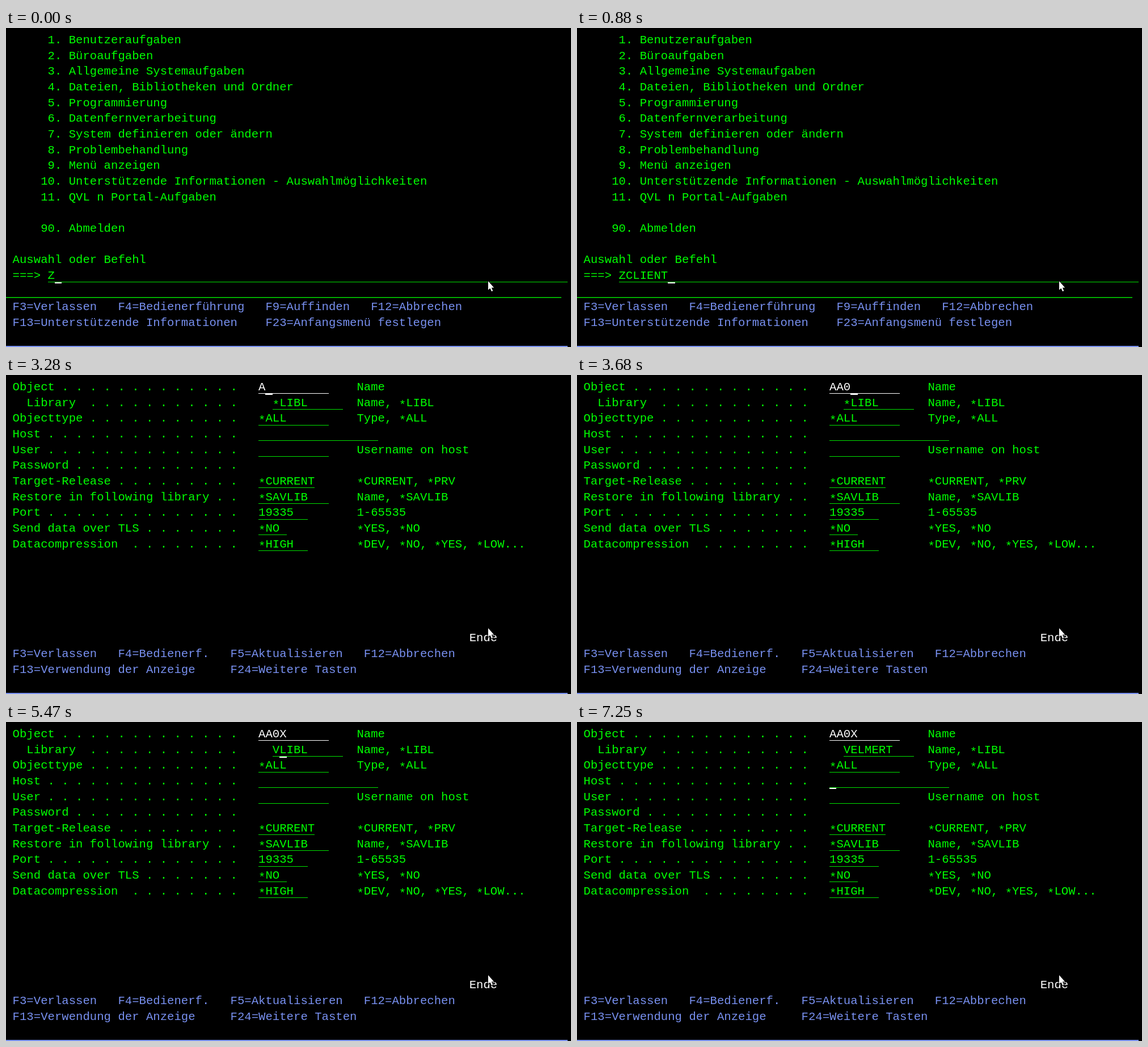
An HTML page with a canvas for the animation above (8 s loop, 996 by 562 pixels).

```html
<!DOCTYPE html>
<html lang="de">
<head>
<meta charset="utf-8">
<style>
html, body { margin: 0; width: 100%; height: 100%; overflow: hidden; background: #000; }
canvas { display: block; }
</style>
</head>
<body>
<canvas id="stage" width="996" height="562"></canvas>
<script>
const ctx = document.getElementById('stage').getContext('2d');
const GREEN = '#00ff00', BLUE = '#7890f0', WHITE = '#ffffff', LINE = '#00e000';
const LOOP = 8000, FORM_AT = 1660;

// Terminal grid
const colX = c => 12.1 + 12.385 * c;
const rowY = r => 27.64 * r;
const cursorY = r => Math.ceil(33 + rowY(r));

const menu = ['Benutzeraufgaben', 'Büroaufgaben', 'Allgemeine Systemaufgaben',
  'Dateien, Bibliotheken und Ordner', 'Programmierung', 'Datenfernverarbeitung',
  'System definieren oder ändern', 'Problembehandlung', 'Menü anzeigen',
  'Unterstützende Informationen - Auswahlmöglichkeiten', 'QVL n Portal-Aufgaben'];

// label, value, field length, hint
const form = [
  ['Object', '', 10, 'Name'],
  ['  Library', '*LIBL', 10, 'Name, *LIBL'],
  ['Objecttype', '*ALL', 10, 'Type, *ALL'],
  ['Host', '', 17, ''],
  ['User', '', 10, 'Username on host'],
  ['Password', '', 0, ''],
  ['Target-Release', '*CURRENT', 8, '*CURRENT, *PRV'],
  ['Restore in following library', '*SAVLIB', 10, 'Name, *SAVLIB'],
  ['Port', '19335', 7, '1-65535'],
  ['Send data over TLS', '*NO', 4, '*YES, *NO'],
  ['Datacompression', '*HIGH', 7, '*DEV, *NO, *YES, *LOW...']
];

const typing = {
  command: ['ZCLIENT', [0, 170, 320, 490, 560, 730, 880]],
  object: ['AA0X', [3280, 3510, 3680, 3910]],
  library: ['VELMERT', [5470, 5540, 5710, 5940, 6090, 6170, 6320]]
};
const typed = ([text, times], t) => text.slice(0, times.filter(at => t >= at).length);

function write(text, col, row, color = GREEN) {
  ctx.fillStyle = color;
  [...text].forEach((ch, i) => {
    // asterisks sit at mid height on this terminal
    const drop = ch === '*' ? 4 : 0;
    ctx.fillText(ch, colX(col + i) - 0.5, 27.2 + rowY(row) + drop);
  });
}

function bar(x, y, w, h, color) {
  ctx.fillStyle = color;
  ctx.fillRect(x, y, w, h);
}

function underline(col, row, length, color = LINE) {
  const x = Math.floor(colX(col));
  bar(x, cursorY(row) - 1, Math.floor(colX(col + length)) - x, 1, color);
}

function cursor(col, row) {
  const x = Math.floor(colX(col));
  bar(x, cursorY(row), Math.floor(colX(col + 1)) - x, 2, WHITE);
}

function drawMenu(t) {
  menu.forEach((item, i) => write(`${i + 1}. `.padStart(4) + item, 4, i));
  write('90. Abmelden', 4, 12);
  write('Auswahl oder Befehl', 0, 14);
  const command = typed(typing.command, t);
  write('===> ' + command, 0, 15);
  underline(5, 15, 74);
  cursor(5 + command.length, 15);
  bar(0, 474, 979, 1.5, LINE);
  write('F3=Verlassen   F4=Bedienerführung   F9=Auffinden   F12=Abbrechen', 0, 17, BLUE);
  write('F13=Unterstützende Informationen    F23=Anfangsmenü festlegen', 0, 18, BLUE);
}

function drawForm(t) {
  const object = typed(typing.object, t);
  const library = typed(typing.library, t);
  form.forEach(([label, value, length, hint], row) => {
    const col = row === 1 ? 37 : 35;
    const text = row === 0 ? object : row === 1 ? library + value.slice(library.length) : value;
    write(label, 0, row);
    for (let c = 31; c > label.length; c -= 2) write('.', c, row);
    underline(col, row, length, row ? LINE : WHITE);
    write(text, col, row, row ? GREEN : WHITE);
    write(hint, 49, row);
  });
  if (t < 4230) cursor(35 + object.length, 0);
  else if (t < 6550) cursor(37 + library.length, 1);
  else if (t < 7250) cursor(t < 7100 ? 35 : 36, 2);
  else cursor(35, 3);
  write('Ende', 65, 16, WHITE);
  write('F3=Verlassen   F4=Bedienerf.   F5=Aktualisieren   F12=Abbrechen', 0, 17, BLUE);
  write('F13=Verwendung der Anzeige     F24=Weitere Tasten', 0, 18, BLUE);
}

const pointer = new Path2D('M850 446V461.5L853.4 458.4L856 464L858.3 463L855.8 457.4H860.2Z');
function drawPointer() {
  ctx.strokeStyle = '#000';
  ctx.lineWidth = 2;
  ctx.stroke(pointer);
  ctx.fillStyle = WHITE;
  ctx.fill(pointer);
}

function render() {
  const t = performance.now() % LOOP;
  bar(0, 0, 996, 562, '#000');
  ctx.font = '20.64px "Liberation Mono", monospace';
  if (t < FORM_AT) drawMenu(t);
  else drawForm(t);
  bar(0, 560, 990, 2, BLUE);
  drawPointer();
  requestAnimationFrame(render);
}
render();
</script>
</body>
</html>
```
